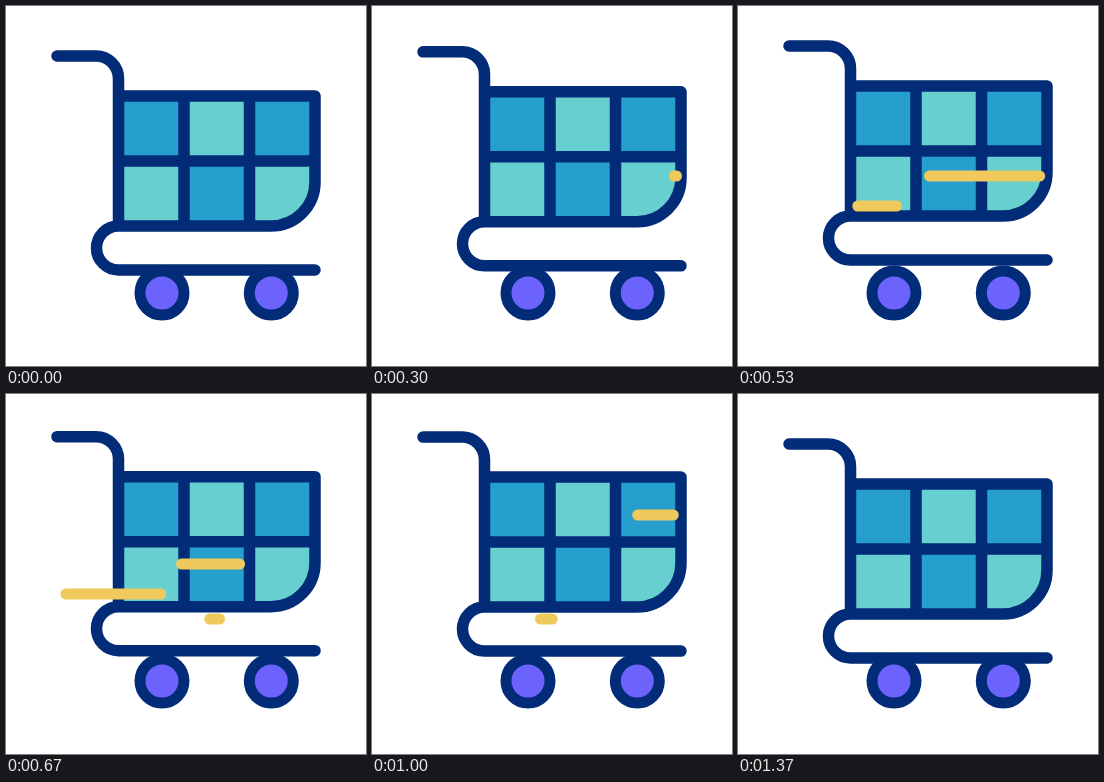
An HTML page for the animation above (2000 ms loop, 360 by 360 pixels).

```html
<!DOCTYPE html>
<html lang="en">
<head>
<meta charset="utf-8">
<title>Shopping cart</title>
<style>
  html, body { margin: 0; height: 100%; overflow: hidden; background: #fff; }
  svg { display: block; width: 100vw; height: 100vh; }
</style>
</head>
<body>
<svg viewBox="0 0 360 360" fill="none" stroke-linecap="round" stroke-linejoin="round">
  <g id="cart">
    <path fill="#68cfd1" d="M112.5 90H309V176a44 44 0 0 1-44 44H112.5Z"/>
    <path fill="#279fcd" d="M112.5 90H178V155H112.5ZM243.5 90H309V155H243.5ZM178 155H243.5V220H178Z"/>
    <path stroke="#022b78" stroke-width="11.5" d="M51 50H90a22.5 22.5 0 0 1 22.5 22.5V220
      M112.5 90H309V176a44 44 0 0 1-44 44H112.5a22 22 0 0 0 0 44H309
      M178 90V220M243.5 90V220M112.5 155H309"/>
  </g>
  <g fill="#6b63fb" stroke="#022b78" stroke-width="11">
    <circle cx="156" cy="287" r="22"/>
    <circle cx="265.3" cy="287" r="22"/>
  </g>
  <g id="streaks" stroke-width="11"></g>
</svg>
<script>
const FPS = 30, LOOP = 2000, LAST = 41;

// Each hop: start, end (frames) and height.
const hops = [[0, 11.2, 12.5], [11.2, 23.7, 11.4], [23.7, 32.6, 11], [32.6, 41, 8]];

// Speed lines run from right to left; start is a frame.
const streaks = [
  { y: 170, from: 304.5, length: 129, start: 8.2 },
  { y: 200, from: 158.5, length: 110, start: 12 },
  { y: 225, from: 213.5, length: 45, start: 17 },
  { y: 121, from: 301.5, length: 43, start: 22.6, paleAt: 33 },
];

const cart = document.getElementById('cart');
const layer = document.getElementById('streaks');

const ease = p => {
  p = Math.min(1, Math.max(0, p));
  return p * p * (3 - 2 * p);
};

function lift(frame) {
  const hop = hops.find(([a, b]) => frame >= a && frame < b);
  if (!hop) return 0;
  const [a, b, height] = hop;
  return height / 2 * (1 - Math.cos(2 * Math.PI * (frame - a) / (b - a)));
}

const line = (x1, x2, y, style) => `<path d="M${x1} ${y}H${x2}" ${style}/>`;

function streak({ y, from, length, start, paleAt }, frame) {
  const head = from - length * ease((frame - start) / 10);
  const tail = from - length * ease((frame - start - 7) / 9);
  if (tail - head < 0.1) return '';
  if (!(frame >= paleAt)) return line(head, tail, y, 'stroke="#efc95c"');
  return line(head, tail, y, 'stroke="#6f8fa0" stroke-width="13"') +
    line(head, tail, y, 'stroke="#fff"') +
    line(head + 3, Math.min(head + 9, tail), y, 'stroke="#80c4df" stroke-width="9"');
}

function draw() {
  const time = performance.now() % LOOP;
  const frame = Math.min(LAST, Math.floor((time + 4) * FPS / 1000));
  cart.setAttribute('transform', `translate(0 ${-lift(frame)})`);
  layer.innerHTML = streaks.map(s => streak(s, frame)).join('');
  requestAnimationFrame(draw);
}
draw();
</script>
</body>
</html>
```
